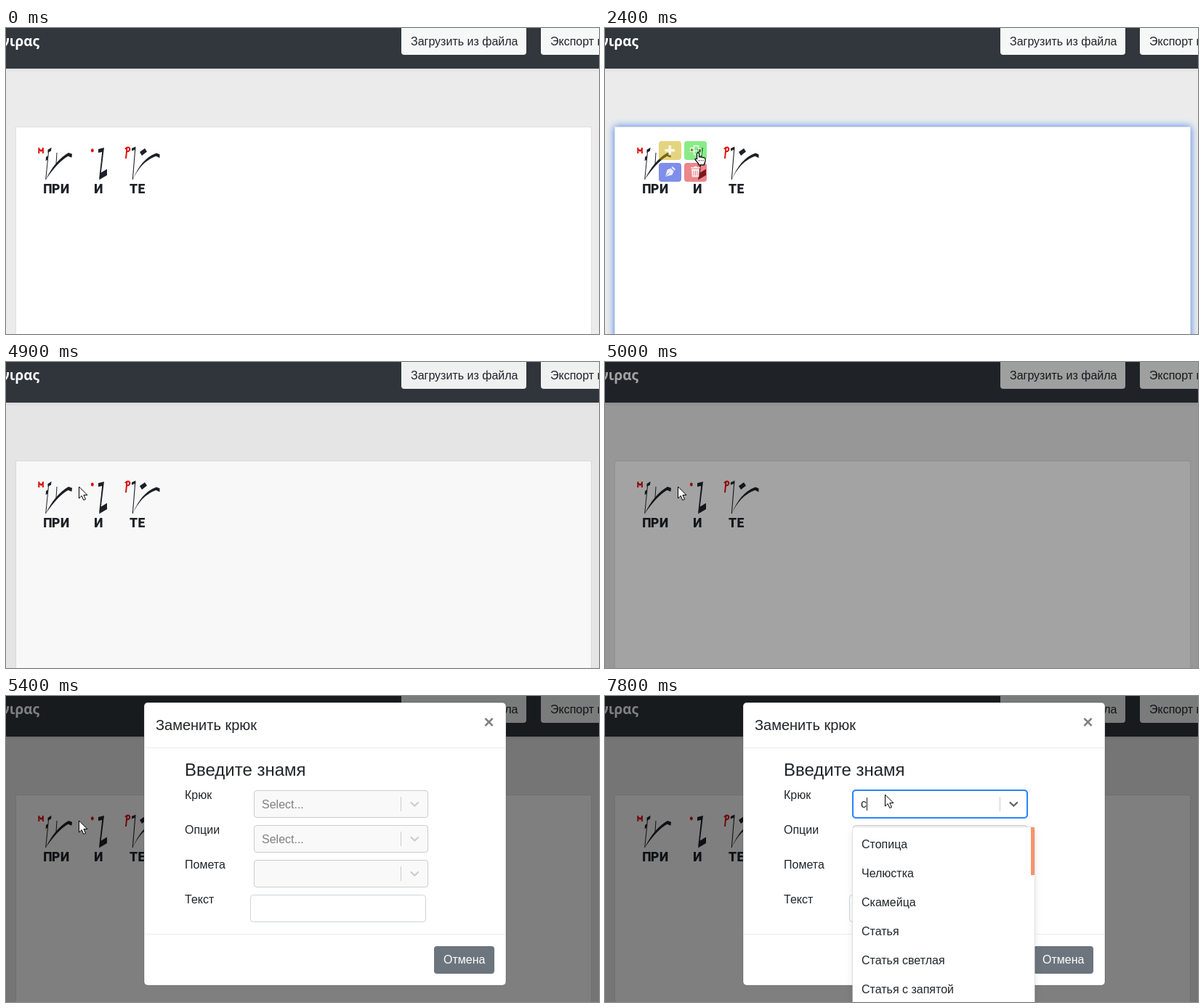
Animation, 816 px wide and 422 px high, one loop 8000 ms. Source, as an HTML page:

```html
<!DOCTYPE html>
<html lang="ru">
<head>
<meta charset="utf-8">
<title>Редактор знамён</title>
<style>
html, body { margin: 0; width: 100%; height: 100%; overflow: hidden; background: #ebebeb; }
.stage { position: relative; width: 816px; height: 422px; overflow: hidden; background: #ebebeb; }
.stage > * { position: absolute; }
.nav { left: 0; top: 0; width: 816px; height: 56px; background: #31373d; box-shadow: 0 2px 4px rgba(0,0,0,.07); }
.card { left: 13px; top: 136px; width: 791px; height: 400px; background: #fff; border: 1px solid #dfdfdf; }
.glow { left: 13px; top: 136px; width: 793px; height: 400px; box-shadow: 0 0 10px #4080f0; animation: glow 8s step-end infinite; }
svg { left: 0; top: 0; }
text { font: 16px "Liberation Sans", Arial, sans-serif; fill: #212529; white-space: pre; }
.brand { font: 700 19px "Open Sans", "Noto Sans", sans-serif; fill: #fff; }
.syl { font: 900 17.5px Roboto, sans-serif; fill: #1d2127; }
.title { font-size: 20px; }
.head { font-size: 24px; }
.close { font-size: 24px; font-weight: 700; fill: #808080; }
.hint { fill: #808080; }
.ink { fill: #1d2127; }
.red { fill: none; stroke: #e01010; stroke-width: 2; stroke-linejoin: round; }
.box { fill: #f9f9f9; stroke: #ccc; }
.sheet { fill: #fff; stroke: rgba(0,0,0,.1); filter: drop-shadow(0 4px 5px rgba(0,0,0,.1)); }

.tools, .dim, .modal, .hover, .focus, .blank, .menu-all, .menu-s, .menu-sk, .arrow, .hand, .cursor {
  animation: 8s step-end infinite;
}
.tools { animation-name: tools; }
.dim { animation-name: dim; }
.modal { animation-name: modal; }
.hover { animation-name: hover; }
.focus { animation-name: focus; }
.blank { animation-name: blank; }
.menu-all { animation-name: menu-all; }
.menu-s { animation-name: menu-s; }
.menu-sk { animation-name: menu-sk; }
.arrow { animation-name: arrow; }
.hand { animation-name: hand; }
.cursor { animation-name: cursor; }

@keyframes glow {
  0% { opacity: 0; } 15% { opacity: .1; } 16.25% { opacity: .5; } 17.5% { opacity: .9; }
  18.75% { opacity: 1; } 61.25%, 100% { opacity: 0; }
}
@keyframes tools { 0% { opacity: 0; } 16.25% { opacity: 1; } 61.25%, 100% { opacity: 0; } }
@keyframes dim { 0% { opacity: 0; } 61.25% { opacity: .027; } 62.5% { opacity: .36; } 63.75%, 100% { opacity: .5; } }
@keyframes modal {
  0% { opacity: 0; transform: translateY(-97px); }
  63.75% { opacity: .33; transform: translateY(-72px); }
  65% { opacity: 1; transform: translateY(-31px); }
  66.25% { opacity: 1; transform: translateY(-5px); }
  67.5%, 100% { opacity: 1; transform: none; }
}
@keyframes hover { 0% { opacity: 0; } 73.75%, 100% { opacity: 1; } }
@keyframes focus { 0% { opacity: 0; } 77.5%, 100% { opacity: 1; } }
@keyframes blank { 0% { opacity: 1; } 88.75%, 100% { opacity: 0; } }
@keyframes menu-all { 0% { opacity: 0; } 78.75% { opacity: 1; } 88.75%, 100% { opacity: 0; } }
@keyframes menu-s { 0% { opacity: 0; } 88.75% { opacity: 1; } 91.25% { opacity: 0; } 97.5%, 100% { opacity: 1; } }
@keyframes menu-sk { 0% { opacity: 0; } 91.25% { opacity: 1; } 97.5%, 100% { opacity: 0; } }
@keyframes arrow { 0% { opacity: 0; } 11.25% { opacity: 1; } 16.25% { opacity: 0; } 61.25%, 100% { opacity: 1; } }
@keyframes hand { 0% { opacity: 0; } 16.25% { opacity: 1; } 61.25%, 100% { opacity: 0; } }
@keyframes cursor {
  0% { transform: translate(123px, 52px); }
  13.75% { transform: translate(124px, 80px); }
  15% { transform: translate(125px, 138px); }
  16.25% { transform: translate(125px, 164px); }
  17.5% { transform: translate(125px, 175px); }
  18.75% { transform: translate(124px, 181px); }
  20% { transform: translate(124px, 187px); }
  21.25% { transform: translate(124px, 192px); }
  26.25% { transform: translate(124px, 190px); }
  28.75% { transform: translate(126px, 180px); }
  30% { transform: translate(128px, 171px); }
  41.25% { transform: translate(125px, 193px); }
  42.5% { transform: translate(111px, 182px); }
  43.75% { transform: translate(102px, 167px); }
  45% { transform: translate(100px, 171px); }
  58.75% { transform: translate(100px, 187px); }
  61.25% { transform: translate(100px, 171px); }
  68.75% { transform: translate(150px, 176px); }
  70% { transform: translate(262px, 160px); }
  71.25% { transform: translate(334px, 146px); }
  73.75%, 100% { transform: translate(385px, 135px); }
}
</style>
</head>
<body>
<div class="stage">
  <div class="nav"></div>
  <div class="glow"></div>
  <div class="card"></div>
  <svg width="816" height="422" viewBox="0 0 816 422">
    <defs>
      <g id="select">
        <rect class="box" x="341.5" y="130.5" width="239" height="37" rx="3.5"/>
        <path d="M543.5 139v20" stroke="#ccc"/>
        <path d="M557.5 147l4.8 4.6 4.8-4.6" fill="none" stroke="#ccc" stroke-width="2.2" stroke-linecap="round"/>
      </g>
    </defs>

    <text class="brand" x="46" y="25" text-anchor="end">νιρας</text>
    <rect x="544" y="-4" width="172" height="41" rx="4" fill="#f6f8f8"/>
    <text x="557" y="24">Загрузить из файла</text>
    <rect x="736" y="-4" width="172" height="41" rx="4" fill="#f6f8f8"/>
    <text x="749" y="24">Экспорт в файл</text>

    <!-- neumes -->
    <path class="red" d="M45.3 165v8M45.3 166.500l3 3.200 3-3.200M50.900 165v8"/>
    <g class="ink">
      <path d="M57.500 168l5-3.200-.5 4.700-4.500 2.500zM55 178l3-2-.3 5-3 2.500z"/>
      <path d="M54.500 209.500Q67 183 86 172l5 1.800-.6 5-5-2Q71 185 54.500 209.500z"/>
      <path d="M58.800 168l-4.100 41M70 172l-1 15" stroke="#1d2127"/>
      <path d="M127 167l8-2-5 41-1.800 1 4-36-5.200 1z"/>
      <path d="M130 200l9-5.500v8.500l-11 6.500z"/>
      <path d="M173 166l5.500-2.500-.3 4-5.200 2zM184 171l7-5 3 4.500-7 5.500z"/>
      <path d="M174.300 209.500Q186 180 207 172.500l4.500 1.800v5l-5-2.500Q186 184 174.300 209.500z"/>
      <path d="M177.800 166l-3.500 43" stroke="#1d2127" stroke-width="1.100"/>
    </g>
    <ellipse cx="118.800" cy="168.800" rx="2" ry="2.600" fill="#e01010"/>
    <path class="red" d="M166.500 165l-1.500 15M164 167q2-3 5-2.300 2.500 2 .5 4.500-1.500 1.300-3.500.8"/>
    <text class="syl" x="51.300 63 75" y="228">ПРИ</text>
    <text class="syl" x="121.200" y="228">И</text>
    <text class="syl" x="170 181.500" y="228">ТЕ</text>

    <g class="tools">
      <g fill-opacity=".5">
        <rect x="74" y="156" width="31" height="26" rx="4" fill="#ccaa00"/>
        <rect x="109" y="156" width="31" height="26" rx="4" fill="#11d811"/>
        <rect x="74" y="186" width="31" height="26" rx="4" fill="#001ed8"/>
        <rect x="109" y="186" width="31" height="26" rx="4" fill="#d80f19"/>
      </g>
      <g fill="#fff" opacity=".85">
        <path d="M87.500 162h3.500v5h5v3.500h-5v5h-3.500v-5h-5V167h5z"/>
        <path d="M117.500 165.500h5v-3h6v7h-6v-4M122.500 167v7.500h10v-8h-4M117.500 165.500v5h5" fill="none" stroke="#fff" stroke-width="1.300"/>
        <path d="M83 205l2.500-9.500 5-2 4 4-2 5zM91.500 192.500l1.500-1.500 4 4-1.500 1.500z"/>
        <path d="M83.500 204.500l5-5" stroke="#7d8ee8"/>
        <path d="M118 192h4l1-1.200h3l1 1.200h4v1.600h-13zM119 194.600h11l-.8 11h-9.400z"/>
        <path d="M122 197v6.500M124.500 197v6.500M127 197v6.500" stroke="#e8868c"/>
      </g>
    </g>

    <rect class="dim" width="816" height="422"/>

    <g class="modal">
      <rect x="190" y="9" width="498" height="390" rx="5" fill="#fff" stroke="rgba(0,0,0,.25)"/>
      <path d="M190 71.500h498M190 328.500h498" stroke="#e9ecef"/>
      <text class="title" x="206" y="47">Заменить крюк</text>
      <text class="close" x="657.500" y="44">×</text>
      <text class="head" x="246" y="110">Введите знамя</text>
      <text x="246" y="142">Крюк</text>
      <text x="246" y="190">Опции</text>
      <text x="246" y="238">Помета</text>
      <text x="246" y="286">Текст</text>
      <use href="#select"/>
      <use href="#select" y="48"/>
      <use href="#select" y="96"/>
      <text class="hint" x="352" y="203">Select...</text>
      <rect x="336.500" y="274.500" width="241" height="37" rx="4" fill="#fff" stroke="#ced4da"/>
      <rect x="589" y="345" width="83" height="38" rx="4" fill="#6c757d"/>
      <text x="602" y="369" style="fill:#fff">Отмена</text>

      <g class="hover">
        <rect x="341.500" y="130.500" width="239" height="37" rx="3.500" fill="#fff" stroke="#b3b3b3"/>
        <path d="M543.500 139v20" stroke="#ccc"/>
        <path d="M557.500 147l4.800 4.600 4.800-4.600" fill="none" stroke="#ccc" stroke-width="2.200" stroke-linecap="round"/>
      </g>
      <g class="focus">
        <rect x="341" y="130" width="240" height="38" rx="4" fill="none" stroke="#2684ff" stroke-width="2"/>
        <path d="M557.500 147l4.800 4.600 4.800-4.600" fill="none" stroke="#666" stroke-width="2.200" stroke-linecap="round"/>
      </g>
      <g class="blank">
        <text class="hint" x="352" y="155">Select...</text>
        <path class="focus" d="M352.500 140v18" stroke="#222"/>
      </g>

      <g class="menu-all">
        <rect class="sheet" x="340.500" y="180.500" width="251" height="300" rx="4"/>
        <rect x="586" y="181" width="5" height="24" fill="#f5936b"/>
        <text x="353" y="210">Параклит</text>
        <text x="353" y="250">Крюк</text>
        <text x="353" y="290">Крюк светлый</text>
        <text x="353" y="330">Стопица</text>
        <text x="353" y="370">Палка</text>
        <text x="353" y="410">Челюстка</text>
      </g>
      <g class="menu-s">
        <text x="352" y="154">с</text>
        <path d="M360.500 140v18" stroke="#222"/>
        <rect class="sheet" x="340.500" y="180.500" width="251" height="300" rx="4"/>
        <rect x="586" y="181" width="5" height="66" fill="#f5936b"/>
        <text x="353" y="210">Стопица</text>
        <text x="353" y="250">Челюстка</text>
        <text x="353" y="290">Скамейца</text>
        <text x="353" y="330">Статья</text>
        <text x="353" y="370">Статья светлая</text>
        <text x="353" y="410">Статья с запятой</text>
      </g>
      <g class="menu-sk">
        <text x="352" y="154">ск</text>
        <path d="M367.500 140v18" stroke="#222"/>
        <rect class="sheet" x="340.500" y="180.500" width="251" height="48" rx="4"/>
        <text x="353" y="210">Скамейца</text>
      </g>
    </g>

    <g class="cursor" stroke="#000" stroke-linejoin="round" fill="#fff">
      <path class="arrow" d="M.5 1v16l3.700-3.500 2.600 6 2.700-1.200-2.600-5.800h5z"/>
      <g class="hand">
        <path d="M-1.500 2Q0 0 1.500 2v5q1.500-1 2.700.3 1.500-.8 2.700.5 2.800-.6 3.100 2v3q-.5 2-1.500 3v2H.5v-2L-4 10.500q0-2 2.500-.8z" stroke-width="1.200"/>
        <path d="M1.500 11v1.500M4.200 11v1.500M6.900 11v1.500" stroke-width=".9"/>
      </g>
    </g>
  </svg>
</div>
</body>
</html>
```
